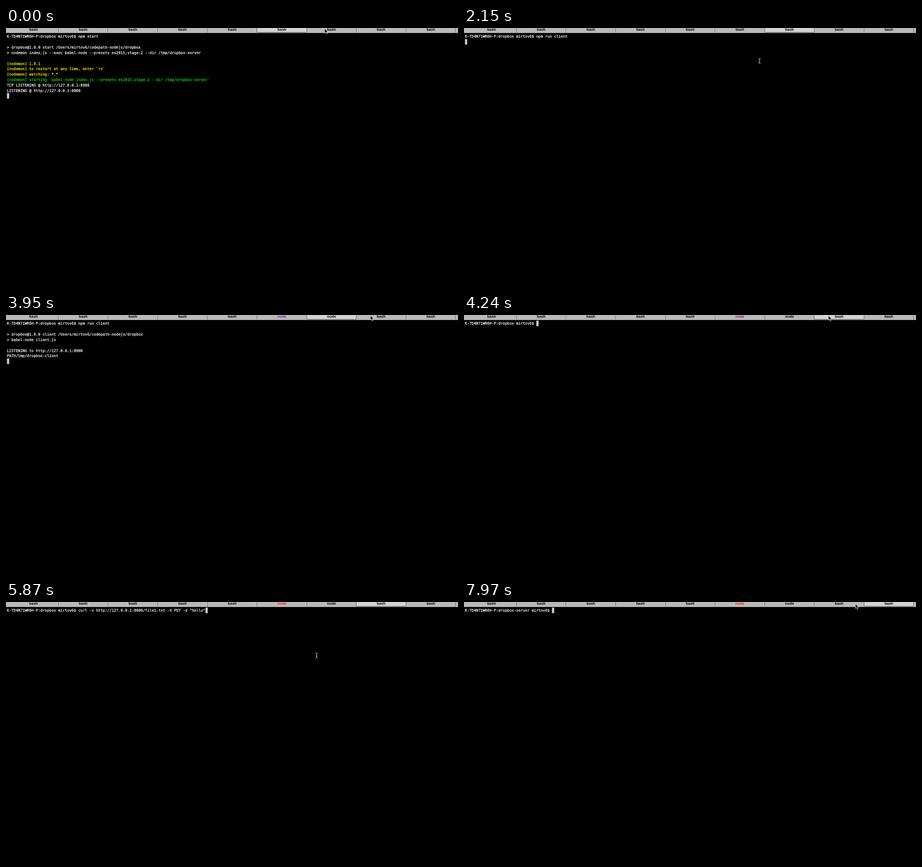
An HTML page that plays this animation: 988x567 px, repeating every 8 s.

```html
<!DOCTYPE html>
<html lang="en">
<head>
<meta charset="utf-8">
<title>Terminal session</title>
<style>
  html, body { margin: 0; width: 100%; height: 100%; overflow: hidden; background: #000; }
  svg { display: block; width: 100vw; height: 100vh; }
  text { text-rendering: geometricPrecision; white-space: pre; }
  .line { font: 8.1px "DejaVu Sans Mono", monospace; stroke-width: .3px; }
  .tab { font: bold 8.1px "Liberation Sans", Arial, sans-serif; text-anchor: middle; }
</style>
</head>
<body>
<svg id="stage" viewBox="0 0 988 567">
  <rect width="988" height="567"/>
  <g id="lines"></g>
  <rect id="caret" width="5" height="12" fill="#c7c7c7"/>
  <rect width="988" height="11" fill="#b9b9b9"/>
  <rect y="10" width="988" height="1" fill="#aaa"/>
  <g id="tabs"></g>
  <path id="arrow" d="M-.6 0V10.2L1.8 8.1L3.5 12L5.3 11.2L3.6 7.4H6.8Z" fill="#000" stroke="#fff" stroke-width=".8"/>
  <path id="beam" d="M-2.6 -5.4Q-.4 -5.4 0 -4Q.4 -5.4 2.6 -5.4M0 -4V4M-2.6 5.4Q-.4 5.4 0 4Q.4 5.4 2.6 5.4M-1.3 1.7H1.3" fill="none" stroke="#ddd" stroke-width="1"/>
</svg>
<script>
const LOOP = 8000, CHAR = 4.876, ROW = 11.82, LEFT = 2;
const TAB_W = 108.55, TAB_X = 5.8, TAB_COUNT = 9;
const WHITE = '#f0f0f0', YELLOW = '#f0ec00', GREEN = '#00dc00';
const PURPLE = '#93148f', RED = '#ff2600';

const user = 'mirtov6', host = 'K-TD4N71WR6H-P';
const prompt = dir => `${host}:${dir} ${user}$ `;
const home = prompt('dropbox');
const script = name => `> dropbox@1.0.0 ${name} /Users/${user}/codepath-nodejs/dropbox`;

const server = [
  home + 'npm start', '', script('start'),
  '> nodemon index.js --exec babel-node --presets es2015,stage-2 --dir /tmp/dropbox-server', '',
  '[nodemon] 1.9.1', '[nodemon] to restart at any time, enter `rs`', '[nodemon] watching: *.*',
  '[nodemon] starting `babel-node index.js --presets es2015,stage-2 --dir /tmp/dropbox-server`',
  'TCP LISTENING @ http://127.0.0.1:8900', 'LISTENING @ http://127.0.0.1:8000', ''
];
const run = home + 'npm run client';
const header = [run, '', script('client'), '> babel-node client.js', ''];
const client = [...header, 'LISTENING to http://127.0.0.1:8900', 'PATH/tmp/dropbox-client', ''];
const curl = home + 'curl -v http://127.0.0.1:8000/file1.txt -X PUT -d "hello"';

// Each step overrides part of the state; the caret follows the last line.
const steps = [
  [0, { lines: server, active: 5, arrow: true, x: 697, y: 1, job5: 'bash', job6: 'bash', color5: '#000' }],
  [600, { lines: [home], active: 6 }],
  [810, { arrow: false, x: 646, y: 72 }],
  [1560, { lines: [run] }],
  [2010, { lines: [run, ''] }],
  [2450, { lines: [...header, ''] }],
  [2600, { job6: 'node' }],
  [2900, { lines: client }],
  [3050, { x: 690, y: 60 }],
  [3200, { x: 755, y: 32 }],
  [3350, { arrow: true, x: 813, y: 4 }],
  [3500, { x: 808, y: 1 }],
  [3800, { job5: 'node', color5: PURPLE }],
  [3950, { x: 797, y: 1 }],
  [4240, { lines: [home], active: 7 }],
  [4390, { arrow: false, x: 768, y: 30 }],
  [4530, { x: 696, y: 66 }],
  [4680, { x: 638, y: 90 }],
  [4980, { x: 617, y: 95 }],
  [5130, { x: 655, y: 110 }],
  [5270, { x: 679, y: 117, lines: [curl] }],
  [5870, { color5: RED }],
  [7070, { x: 789, y: 78 }],
  [7220, { x: 850, y: 50 }],
  [7370, { x: 900, y: 24 }],
  [7520, { arrow: true, x: 919, y: 4 }],
  [7970, { lines: [prompt('dropbox-server')], active: 8, x: 856, y: 4 }]
];

const $ = id => document.getElementById(id);
function add(parent, tag, attrs) {
  const el = document.createElementNS('http://www.w3.org/2000/svg', tag);
  set(el, attrs);
  parent.appendChild(el);
  return el;
}
function set(el, attrs) {
  for (const key in attrs) el.setAttribute(key, attrs[key]);
}

const rows = server.map((_, i) => add($('lines'), 'text', { class: 'line', x: LEFT, y: 21.4 + i * ROW }));

for (let i = 1; i <= TAB_COUNT; i++)
  add($('tabs'), 'rect', { x: Math.round(TAB_X + i * TAB_W - 0.5), width: 1, height: 10, fill: '#6e6e6e' });
const selected = add($('tabs'), 'path', { fill: '#d3d3d3', stroke: '#5c5c5c', 'stroke-width': 1 });
const tabs = Array.from({ length: TAB_COUNT }, (_, i) =>
  add($('tabs'), 'text', { class: 'tab', x: 60.2 + i * TAB_W }));

function lineColor(text) {
  if (text.startsWith('[nodemon] starting')) return GREEN;
  return text.startsWith('[nodemon]') ? YELLOW : WHITE;
}

function draw(t) {
  const s = Object.assign({}, ...steps.filter(([at]) => at <= t).map(([, change]) => change));

  rows.forEach((row, i) => {
    const text = s.lines[i] || '', color = lineColor(text);
    if (row.textContent !== text) row.textContent = text;
    set(row, { fill: color, stroke: color });
  });
  const last = s.lines.length - 1;
  set($('caret'), { x: LEFT + s.lines[last].length * CHAR, y: 12.4 + last * ROW });

  const left = Math.round(TAB_X + s.active * TAB_W - 0.5) + 0.5;
  const right = Math.round(TAB_X + (s.active + 1) * TAB_W - 0.5) + 0.5;
  set(selected, { d: `M${left} -1V7.5Q${left} 9.5 ${left + 2} 9.5H${right - 2}Q${right} 9.5 ${right} 7.5V-1Z` });
  tabs.forEach((tab, i) => {
    tab.textContent = s['job' + i] || 'bash';
    set(tab, { y: i === s.active ? 5.7 : 6.4, fill: i === 5 ? s.color5 : '#000' });
  });

  const at = `translate(${s.x} ${s.y})`;
  set($('arrow'), { transform: at, visibility: s.arrow ? 'visible' : 'hidden' });
  set($('beam'), { transform: at, visibility: s.arrow ? 'hidden' : 'visible' });
}

const start = performance.now();
function tick() {
  draw((performance.now() - start) % LOOP);
  requestAnimationFrame(tick);
}
tick();
</script>
</body>
</html>
```
